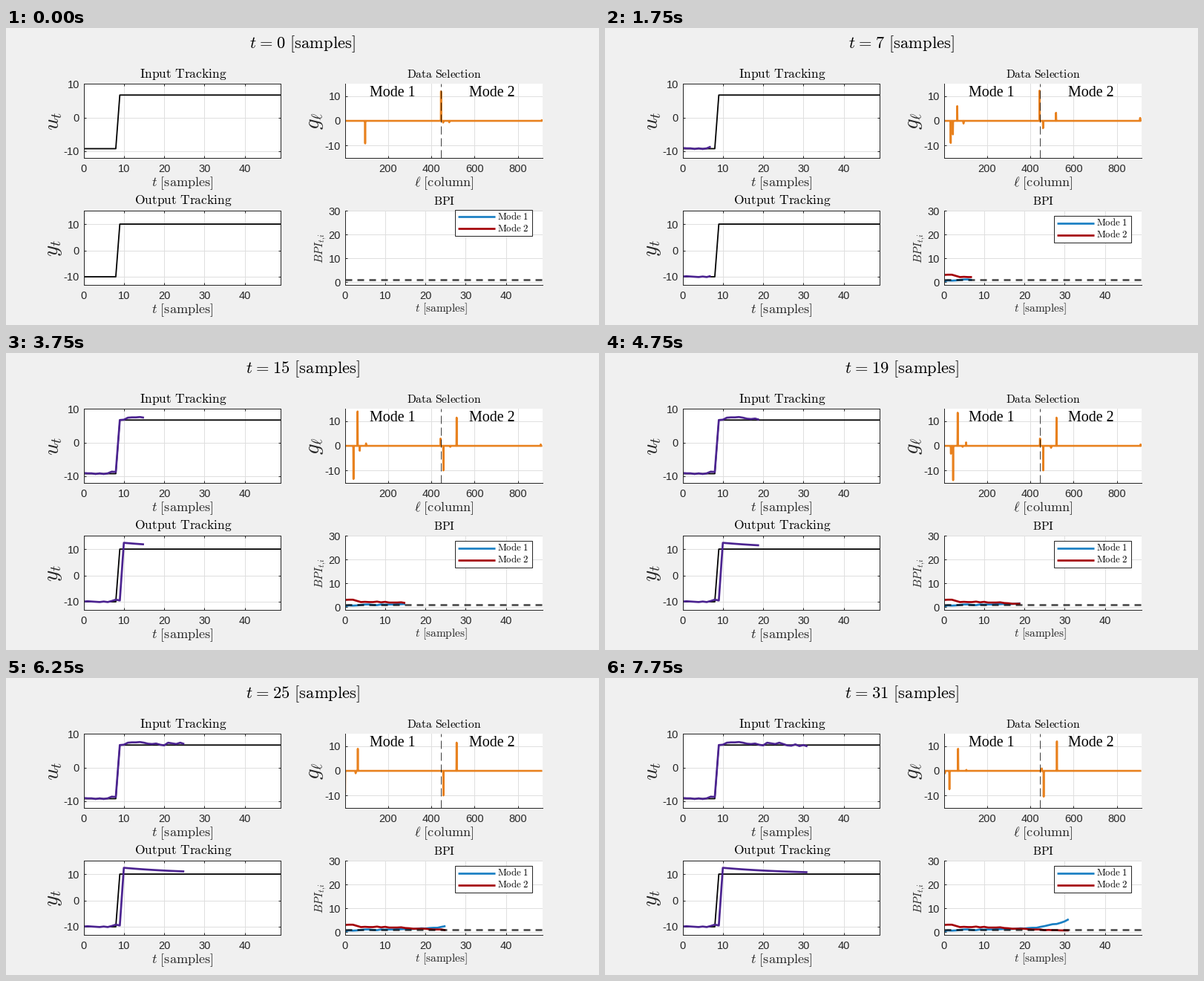
Recreate the animation shown at these times as a matplotlib script. Size 799 by 400 pixels, loop 8000 ms.

```python
import matplotlib.pyplot as plt
import numpy as np
from matplotlib.animation import FuncAnimation
from matplotlib.patches import Rectangle
from matplotlib.transforms import Affine2D

W, H, DPI = 799, 400, 64
FRAMES, INTERVAL = 32, 250
PT = 72 / DPI  # points per pixel

INK, GRID = "#262626", "#dfdfdf"
ORANGE, PURPLE = "#e8811e", "#4c2491"
BLUE, RED = "#1a7fc3", "#a40008"

plt.rcParams.update({"mathtext.fontset": "cm", "path.simplify": False})
fig = plt.figure(figsize=(W / DPI, H / DPI), dpi=DPI, facecolor="#f0f0f0")

# Overlay in pixel coordinates, y pointing down
over = fig.add_axes([0, 0, 1, 1], zorder=5)
over.set(xlim=(0, W), ylim=(H, 0))
over.axis("off")


def text(x, y, s, size, color="black", ha="center", va="baseline", **kw):
    return over.text(x, y, s, fontsize=size * PT, color=color, ha=ha, va=va, **kw)


def roman(s):
    return r"\mathrm{" + s.replace(" ", r"\ ") + "}"


def panel(left, top, xlim, ylim, xticks, yticks, boxed):
    right, bottom = left + 266, top + 99.3
    ax = fig.add_axes([left / W, 1 - bottom / H, 266 / W, 99.3 / H])
    ax.set(xlim=xlim, ylim=ylim, xticks=xticks, yticks=yticks)
    ax.set_axisbelow(True)
    ax.grid(color=GRID, lw=PT)
    ax.tick_params(direction="in", length=2.7 * PT, width=PT, color=INK,
                   labelbottom=False, labelleft=False, top=boxed, right=boxed)
    for side, spine in ax.spines.items():
        spine.set(color=INK, linewidth=PT)
        spine.set_visible(boxed or side in ("left", "bottom"))
    for v in xticks:
        x = left + (v - xlim[0]) / (xlim[1] - xlim[0]) * (right - left)
        text(x, bottom + 19.7, str(v), 14.67, INK, family="Liberation Sans")
    for v in yticks:
        y = bottom - (v - ylim[0]) / (ylim[1] - ylim[0]) * (bottom - top)
        text(left - 5.5, y + 5.4, str(v), 14.67, INK, ha="right",
             family="Liberation Sans")
    return ax


def curve(ax, color, width, **kw):
    return ax.plot([], [], color=color, lw=width * PT, solid_joinstyle="round",
                   solid_capstyle="butt", **kw)[0]


tens = range(0, 50, 10)
ax_u = panel(104.5, 75.4, (0, 49), (-12, 10), tens, (-10, 0, 10), True)
ax_y = panel(104.5, 246.4, (0, 49), (-13, 15), tens, (-10, 0, 10), True)
ax_g = panel(456.5, 75.4, (1, 912), (-15, 15), range(200, 900, 200),
             (-10, 0, 10), False)
ax_b = panel(456.5, 246.4, (0, 49), (-1, 30), tens, (0, 10, 20, 30), False)

# Titles and axis labels
head = text(399.5, 27.5, "", 22.5)
text(238.5, 66.5, f"${roman('Input Tracking')}$", 17.5)
text(238.5, 237.3, f"${roman('Output Tracking')}$", 17.5)
text(590, 67, f"${roman('Data Selection')}$", 15.6)
text(590.5, 238, f"${roman('BPI')}$", 15.6)
samples = rf"$t\ {roman('[samples]')}$"
text(237.5, 213.3, samples, 18.2, INK)
text(237.5, 384.3, samples, 18.2, INK)
text(587, 382, samples, 15.4, INK)
text(590, 213.3, rf"$\ell\ {roman('[column]')}$", 18.2, INK)
for x, y, s, size in ((63.5, 125, "$u_t$", 29), (63.5, 297, "$y_t$", 29),
                      (415.5, 125, r"$g_\ell$", 29),
                      (424, 296.5, r"$BPI_{t,\hspace{-0.2}i}$", 15.4)):
    text(x, y, s, size, INK, va="center", rotation=90)
for x, s in ((490, "Mode 1"), (624, "Mode 2")):
    text(x, 92.3, s, 20, ha="left", family="Liberation Serif")

# Tracked signals
steps = np.arange(FRAMES)
u = np.array([-9.1, -9.2, -9.2, -9.4, -9.2, -9.4, -9.2, -8.7, -8.8, 6.7, 6.8,
              7.4, 7.5, 7.5, 7.6, 7.4, 7.1, 7.0, 7.15, 6.8, 6.6, 7.4, 7.2,
              7.0, 7.4, 7.0, 6.6, 6.5, 6.9, 6.4, 6.7, 6.3])
y = 10 + 2.4 * np.exp(-0.057 * (steps - 10))
y[:10] = [-9.9, -9.8, -9.9, -10, -10.1, -9.9, -10.1, -9.7, -9.2, -9.5]
bpi1 = np.array([0.4, 0.8, 0.7, 0.8, 1.0, 1.2, 1.2, 1.0, 0.9, 1.2, 1.1, 1.2,
                 1.2, 1.3, 1.3, 1.4, 1.3, 1.4, 1.5, 1.7, 1.6, 1.8, 1.9, 1.9,
                 2.3, 2.6, 3.0, 3.4, 3.5, 4.0, 4.6, 5.5])
bpi2 = np.array([3.1, 3.2, 3.2, 2.7, 2.2, 2.3, 2.2, 2.2, 2.4, 2.1, 2.3, 2.0,
                 2.0, 2.0, 2.1, 1.8, 1.7, 1.5, 1.5, 1.5, 1.5, 1.3, 1.2, 1.2,
                 1.2, 0.9, 1.0, 0.9, 0.9, 0.8, 0.8, 0.8])

ref_t = [0, 8, 9, 49]
for ax, low, high in ((ax_u, -9.3, 6.7), (ax_y, -10, 10)):
    curve(ax, "black", 1.8).set_data(ref_t, [low, low, high, high])

tracks = [(curve(ax_u, PURPLE, 2.7), u), (curve(ax_y, PURPLE, 2.7), y),
          (curve(ax_b, BLUE, 2.7), bpi1), (curve(ax_b, RED, 2.7), bpi2)]
ax_b.plot([0, 49], [1, 1], color="black", alpha=0.72, lw=2.6 * PT,
          dashes=(9 / 2.6, 7 / 2.6), dash_capstyle="butt")

# Spikes: base columns and heights at the key samples
columns = np.arange(1, 913)
spike_line = curve(ax_g, ORANGE, 2.6)
ax_g.plot([446, 446], [-15, 15], color="black", alpha=0.75, lw=PT,
          dashes=(11, 5), dash_capstyle="butt")
KEYS = (0, 7, 11, 15, 19, 25, 31)
SPIKES = (
    ((90, 31, 30, 41, 40, 2, 21), (-9.2, -9, -14.5, -13.5, -14, -9, -7.5)),
    ((95, 41, 79, 70, 30, 51, 0), (0, -5.5, -6.2, -2, -3.2, -1, -1)),
    ((70, 61, 52, 60, 61, 61, 61), (0, 6, 16, 14, 13.5, 9, 9)),
    ((90, 90, 89, 80, 84, 80, 80), (0, -1.1, -3, 0, -0.4, 0, 0)),
    ((100, 98, 100, 99, 100, 100, 99), (0, 0, 4.2, 1, 1.4, 0, 0.4)),
    ((119,) * 7, (0, 0, 6.2, 0, 0, 0, 0)),
    ((440, 441, 439, 443, 441, 443, 447), (12, 12.3, 3.3, 3, 3, 0, 1)),
    ((450, 457, 456, 456, 456, 456, 456), (-0.7, -3, -4.6, -10, -10, -10, -10.5)),
    ((478, 490, 486, 488, 492, 490, 490), (-0.6, 0, -1.6, -0.4, -0.8, 0, 0)),
    ((517,) * 7, (0, 3.3, 5.8, 11.5, 11.5, 11.5, 12)),
    ((905,) * 7, (0.3, 1.2, 0, 0.6, 0.6, 0, 0)),
)


def spikes(t):
    """Spikes drift one column per sample and wrap every ten samples."""
    g = np.zeros(len(columns))
    drift = (t + 5) % 10
    for base, height in SPIKES:
        col = round(np.interp(t, KEYS, base) + drift)
        g[min(col, 911) - 1] += np.interp(t, KEYS, height)
    return g


# Legend, which settles lower once the curves appear
shift = Affine2D()
legend_tf = shift + over.transData
over.add_patch(Rectangle((604.5, 244.8), 104, 35.4, fc="white", ec=INK, lw=PT,
                         transform=legend_tf))
for row, color, name in ((254.2, BLUE, "Mode 1"), (270.2, RED, "Mode 2")):
    over.plot([609, 659], [row, row], color=color, lw=2.7 * PT,
              solid_capstyle="butt", transform=legend_tf)
    text(662, row + 3.6, f"${roman(name)}$", 12.8, ha="left",
         transform=legend_tf)


def update(t):
    head.set_text(rf"$t\hspace{{0.08}}=\hspace{{0.08}}{t}\ {roman('[samples]')}$")
    for line, values in tracks:
        line.set_data(steps[:t + 1], values[:t + 1])
        line.set_visible(t > 0)
    spike_line.set_data(columns, spikes(t))
    shift.clear().translate(0, 8.4 if t else 0)


anim = FuncAnimation(fig, update, frames=FRAMES, interval=INTERVAL,
                     repeat=True, repeat_delay=0)
plt.show()
```
